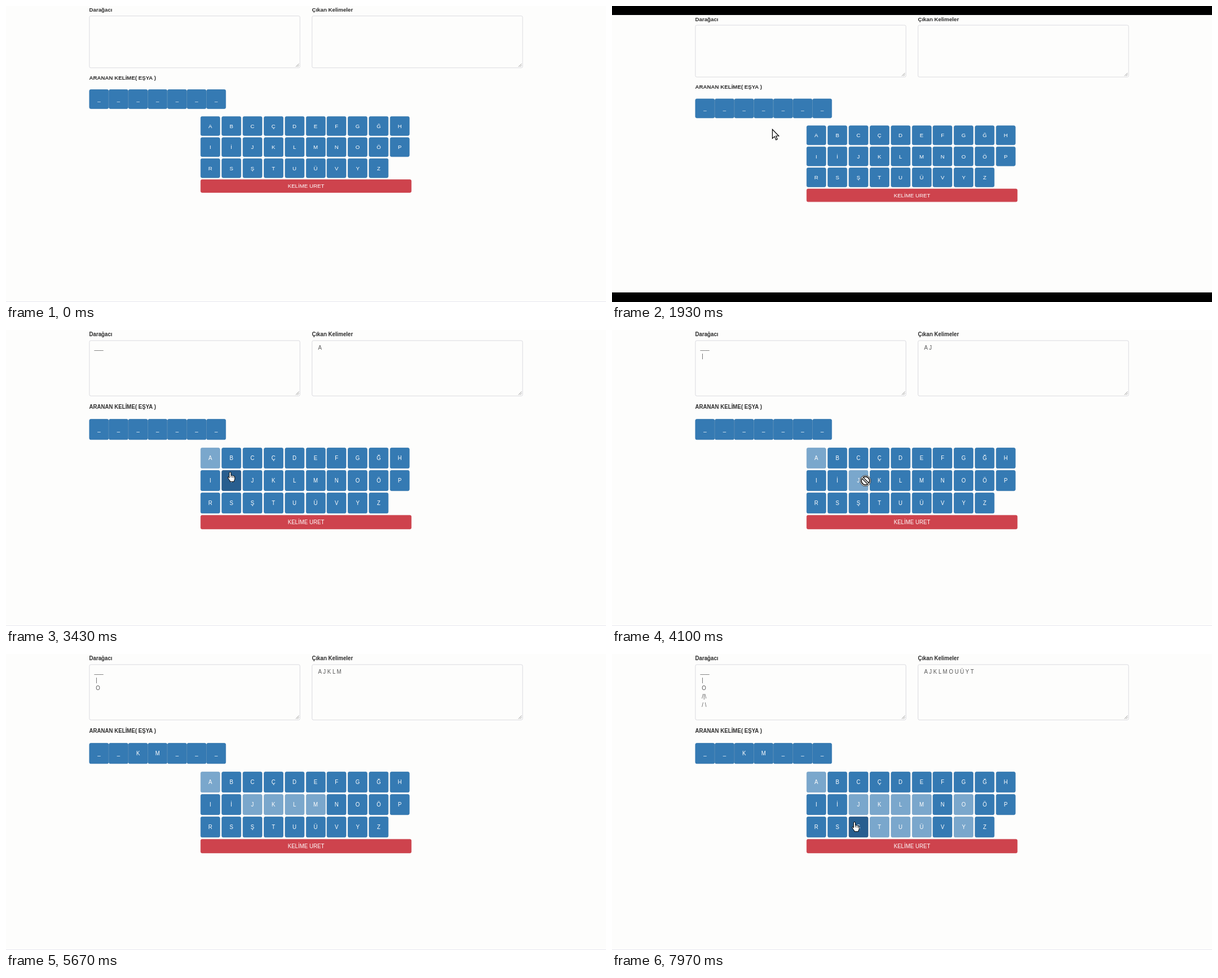
An HTML page that plays this animation: 1064x526 px, repeating every 8000 ms.

```html
<!DOCTYPE html>
<html lang="tr">
<head>
<meta charset="utf-8">
<title>Adam asmaca</title>
<style>
  html, body { margin: 0; width: 100%; height: 100%; overflow: hidden; }
  body { background: #fdfdfc; color: #2b2b2b; }
  #stage { position: relative; width: 1064px; height: 526px; overflow: hidden; }
  #page {
    position: absolute; left: 0; top: 0; width: 1536px; height: 712px; transform-origin: 0 0;
    font: 14px/20px "Liberation Sans", Arial, sans-serif;
  }
  #page > * { position: absolute; box-sizing: border-box; }
  .left { left: 213px; }
  .right { left: 783px; }
  .label { font-weight: bold; white-space: pre; }
  .area {
    top: 25px; width: 540px; height: 134px; padding: 6px 12px;
    border: 1px solid #ccccd2; border-radius: 4px; white-space: pre; color: #555;
  }
  .area svg { position: absolute; right: 1px; bottom: 1px; }
  .btn {
    height: 50px; width: 50px; line-height: 48px; text-align: center;
    color: #fff; background: #357ab3; border: 1px solid #3074ab; border-radius: 4px;
  }
  .btn.hover { background: #285e8f; border-color: #225180; }
  .btn.used { opacity: .65; }
  .btn.red {
    left: 498px; top: 444.5px; width: 540px; height: 34px;
    line-height: 32px; background: #ce434d; border-color: #c93f49;
  }
  .bar { position: absolute; left: 0; width: 100%; background: #000; }
  #edge { position: absolute; left: 0; top: 525px; width: 100%; height: 1px; background: #e6e7ef; }
  #cursor { position: absolute; left: 0; top: 0; overflow: visible; }
</style>
</head>
<body>
<div id="stage">
  <div id="page">
    <div class="label left" style="top:0">Darağacı</div>
    <div class="label right" style="top:0">Çıkan Kelimeler</div>
    <div class="area left"><span id="gallows"></span></div>
    <div class="area right"><span id="tried"></span></div>
    <div class="label left" style="top:174px">ARANAN KELİME( EŞYA )</div>
    <div class="btn red">KELİME URET</div>
  </div>
  <div id="edge"></div>
  <div class="bar" style="top:0;height:16px"></div>
  <div class="bar" style="bottom:0;height:17px"></div>
  <svg id="cursor" width="1" height="1">
    <g id="arrow">
      <path d="M0 0V16L3.8 12.6 6.4 18.6 8.8 17.5 6.3 11.7H11.4Z" fill="#fff" stroke="#000" stroke-width="1.2"/>
    </g>
    <g id="hand">
      <path d="M-1.6 10V1Q-1.5-.5 0-.5T1.5 1V5.6Q2.8 4.6 4 6 5.4 5.1 6.4 6.7 8.2 6.2 8.3 8.2V11.4Q8.2 13.4 6.9 14.6V16.5H-.2V15Q-2.2 13-4.2 9.3-4.2 7.4-2.6 8Z"
        fill="#fff" stroke="#000"/>
      <path d="M1.5 6V9M4 7V9.4M6.4 7.6V9.8" stroke="#000" stroke-width=".8"/>
    </g>
    <g id="blocked" fill="none" stroke="#111">
      <circle r="9.6" fill="#fff" stroke-width=".8"/>
      <circle r="7.3" stroke-width="1.8"/>
      <path d="M-5-5L5 5" stroke-width="4"/>
      <path d="M-5.5-5.5L5.5 5.5" stroke="#fff" stroke-width="1.4"/>
    </g>
  </svg>
</div>
<script>
  const LOOP = 8000, BARS_IN = 450, STRETCH = 3070;
  const ZOOM = 1064 / 1536, KEY = 50, PITCH = 54;
  const HOME = { x: 214, y: 210, from: 970, to: 1530 };
  const WORD = '__KM___';
  const GALLOWS = ['___', '\n |', '\n O', '\n /', '|', '\\', '\n /', ' \\'];
  const CLICKS = { A: 2250, J: 3750, K: 4550, L: 4950, M: 5420, O: 5850, U: 6400, Ü: 6960, Y: 7450, T: 7760 };

  const byId = id => document.getElementById(id);
  const page = byId('page'), cursor = byId('cursor');
  const bars = document.querySelectorAll('.bar');

  function addButton(text, x, y) {
    const el = document.createElement('div');
    el.className = 'btn';
    el.textContent = text;
    el.style.left = x + 'px';
    el.style.top = y + 'px';
    page.append(el);
    return { el, text, x, y };
  }

  const keys = ['ABCÇDEFGĞH', 'IİJKLMNOÖP', 'RSŞTUÜVYZ'].flatMap((row, r) =>
    [...row].map((ch, c) => addButton(ch, 498 + c * 53.9, 282.7 + r * PITCH)));
  const slots = [...WORD].map((_, i) => addButton('_', 213 + i * KEY, 214.3));

  for (const area of document.querySelectorAll('.area')) {
    area.insertAdjacentHTML('beforeend',
      '<svg width="10" height="10"><path d="M1 9L9 1M5 9L9 5" stroke="#777"/></svg>');
  }

  function layoutAt(t) {
    const boxed = t >= BARS_IN && t < STRETCH;
    return { boxed, top: boxed ? 16.4 : 0, scaleY: t < STRETCH ? ZOOM : ZOOM * 526 / 493 };
  }

  // The pointer pauses at each stop: every clicked key plus a few resting places.
  const stop = (t, x, y, hold = 120) => ({ t, x, y, end: t + hold });
  const keyStops = Object.entries(CLICKS).map(([ch, t]) => {
    const key = keys.find(k => k.text === ch), { top, scaleY } = layoutAt(t);
    return stop(t - 40, (key.x + KEY / 2) * ZOOM, top + (key.y + KEY / 2) * scaleY, 160);
  });
  const stops = [
    stop(BARS_IN, 188, 321, 0),
    stop(870, HOME.x, HOME.y, 800),
    stop(2780, 397.5, 253, 650),
    stop(4070, 449.5, 268),
    stop(7960, 430, 299),
    ...keyStops
  ].sort((a, b) => a.t - b.t);

  function pointerAt(t) {
    if (t < BARS_IN || (t > 5570 && t < 5740)) return null;
    if (t > HOME.from && t < HOME.to) {
      const a = (t - HOME.from) / (HOME.to - HOME.from) * 2 * Math.PI;
      return { x: HOME.x + 29 * Math.sin(a), y: HOME.y - 25 * (1 - Math.cos(a)) };
    }
    const i = stops.findLastIndex(s => s.t <= t);
    const a = stops[i], b = stops[i + 1];
    if (t <= a.end || !b) return a;
    const u = (t - a.end) / (b.t - a.end), e = u * u * (3 - 2 * u);
    return { x: a.x + (b.x - a.x) * e, y: a.y + (b.y - a.y) * e };
  }

  function setText(el, text) {
    if (el.textContent !== text) el.textContent = text;
  }

  function draw(t) {
    const { boxed, top, scaleY } = layoutAt(t);
    page.style.transform = `translateY(${top}px) scale(${ZOOM}, ${scaleY})`;
    bars.forEach(b => b.style.display = boxed ? '' : 'none');

    const done = Object.keys(CLICKS).filter(ch => CLICKS[ch] <= t);
    const misses = done.filter(ch => !WORD.includes(ch)).length;
    setText(byId('gallows'), GALLOWS.slice(0, misses).join(''));
    setText(byId('tried'), done.map(ch => ' ' + ch).join(''));
    slots.forEach((s, i) => setText(s.el, done.includes(WORD[i]) ? WORD[i] : '_'));

    const p = pointerAt(t);
    let shape = 'arrow';
    for (const k of keys) {
      const used = done.includes(k.text);
      const dx = p ? p.x / ZOOM - k.x : -1, dy = p ? (p.y - top) / scaleY - k.y : -1;
      const over = dx >= 0 && dx <= KEY && dy >= 0 && dy <= KEY;
      k.el.classList.toggle('used', used);
      k.el.classList.toggle('hover', over && !used);
      if (over) shape = used && t - CLICKS[k.text] > 200 ? 'blocked' : 'hand';
    }

    cursor.style.display = p ? '' : 'none';
    if (p) {
      cursor.style.transform = `translate(${p.x}px, ${p.y}px)`;
      for (const g of cursor.children) g.style.display = g.id === shape ? '' : 'none';
    }
  }

  function tick() {
    draw(performance.now() % LOOP);
    requestAnimationFrame(tick);
  }
  draw(0);
  requestAnimationFrame(tick);
</script>
</body>
</html>
```
